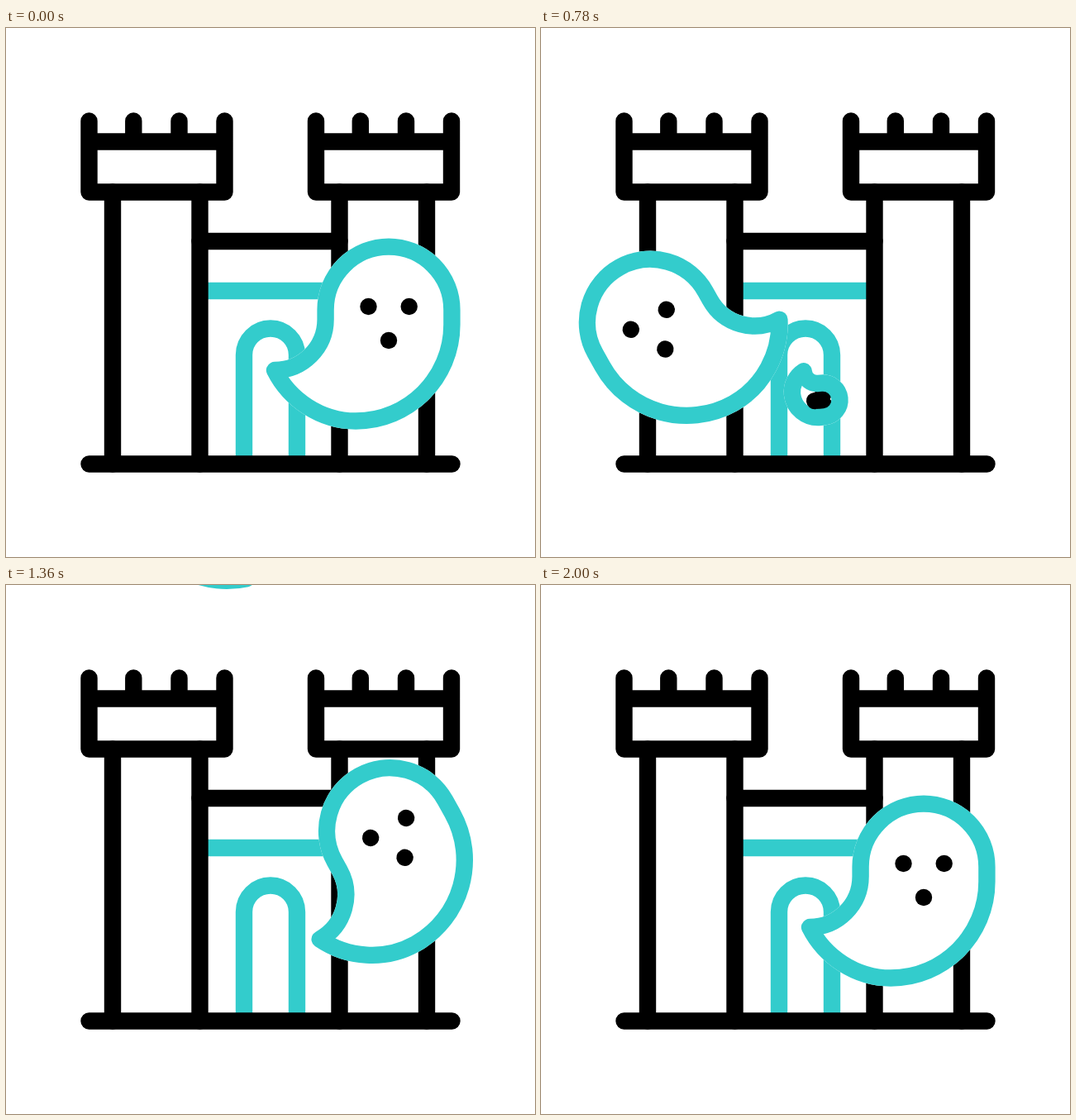
Recreate the animation shown at these times as an HTML page. Size 640 px wide and 640 px high, loop 2400 ms.

```html
<!DOCTYPE html>
<html lang="en">
<head>
<meta charset="utf-8">
<title>Haunted castle</title>
<style>
  html, body { margin: 0; width: 100%; height: 100%; overflow: hidden; background: #fff; }
  svg { display: block; width: 640px; height: 640px; }
  path { fill: none; stroke: #000; stroke-width: 20.4; stroke-linecap: round; stroke-linejoin: round;
         vector-effect: non-scaling-stroke; }
  .teal { stroke: #3cc; }
  .mask { fill: #fff; stroke: #fff; }
  .flat { stroke-linecap: butt; }
</style>
</head>
<body>
<svg>
  <defs>
    <g id="tower">
      <path d="M100.5 112.5V198.5H264.5V112.5M100.5 137.5H264.5M154.3 112.5V137M209.5 112.5V137"/>
      <path d="M129 198.5V527.5M234.5 198.5V527.5"/>
    </g>
  </defs>
  <path class="teal flat" d="M240 318H398M288 520V395.5A32 32 0 0 1 352 395.5V520"/>
  <use href="#tower"/>
  <use href="#tower" x="274.5"/>
  <path d="M234.5 258H403.5M100.5 527.5H539.5"/>
  <g id="ghosts"></g>
</svg>
<script>
const MOVE = 2000, HOLD = 400, STEP = 20, GROW = 440;
const DOOR = [320, 425, 100];

// Ghost outline with the head centre at 0,0
const BODY = 'M-76.4 0A76.4 76.4 0 0 1 76.4 0V18C76.4 82.3 24.3 134.5 -40 134.5' +
  'C-82 134.5 -120 109 -138 73C-104 73 -76.4 45.5 -76.4 11.5Z';

// Each ghost leaves the door at `born` and passes a few points: time, x, y, turn
const flights = [
  { born: -GROW, side: 1, via: [
    [-360, 349, 500, 87], [0, 463, 341, 0], [180, 518, 222, -21], [320, 491, 110, -41.3]] },
  { born: 183, side: -1, via: [
    [320, 285, 446, 86], [540, 221, 487, 60], [780, 132.3, 356.2, 29.2],
    [1040, 143, 102.7, -13], [1360, 261, -161, -51]] },
  { born: 662, side: 1, via: [
    [780, 341, 450, 84], [1040, 399.5, 501.6, 40.6],
    [1360, 464.5, 297.5, -29.2], [1640, 418.3, 43, -62.6]] }
];

const layer = document.getElementById('ghosts');
for (const flight of flights) {
  flight.keys = [[flight.born, ...DOOR], ...flight.via];
  flight.node = document.createElementNS('http://www.w3.org/2000/svg', 'g');
  flight.node.innerHTML = `<path class="mask" d="${BODY}"/>
    <path d="M-24.5 -4h.01M24.7 -4h.01"/>
    <path class="teal" d="${BODY}"/>
    <path d="M0 37h.01"/>`;
  layer.append(flight.node);
}

const rate = (a, b, c) => (b[c] - a[c]) / (b[0] - a[0]);

// Slope of channel c at key i, leaning towards the nearer neighbour
function slope(keys, i, c) {
  const a = keys[i - 1], k = keys[i], b = keys[i + 1];
  if (!a) return rate(k, b, c);
  if (!b) return rate(a, k, c);
  return (rate(a, k, c) * (b[0] - k[0]) + rate(k, b, c) * (k[0] - a[0])) / (b[0] - a[0]);
}

// Smooth curve through the keys, straight on after the last one
function follow(keys, t, c) {
  const j = keys.findIndex(k => k[0] > t);
  if (j < 0) {
    const end = keys.length - 1;
    return keys[end][c] + slope(keys, end, c) * (t - keys[end][0]);
  }
  const a = keys[j - 1], b = keys[j], span = b[0] - a[0], u = (t - a[0]) / span;
  const ma = slope(keys, j - 1, c) * span, mb = slope(keys, j, c) * span, d = b[c] - a[c];
  return a[c] + u * (ma + u * (3 * d - 2 * ma - mb + u * (ma + mb - 2 * d)));
}

function draw(now) {
  for (const { born, side, keys, node } of flights) {
    // A ghost born before zero appears at the end of the previous round
    const t = now >= MOVE + born && born < 0 ? now - MOVE : now;
    const size = Math.min(1, (t - born) / GROW);
    node.setAttribute('display', size > 0 ? 'inline' : 'none');
    if (size <= 0) continue;
    const [x, y, turn] = [1, 2, 3].map(c => follow(keys, t, c));
    node.setAttribute('transform',
      `translate(${x} ${y}) scale(${side * size} ${size}) rotate(${turn})`);
  }
}

const start = performance.now();
function tick() {
  const t = (performance.now() - start) % (MOVE + HOLD);
  draw(Math.min(MOVE, Math.floor(t / STEP) * STEP));
  requestAnimationFrame(tick);
}
tick();
</script>
</body>
</html>
```
